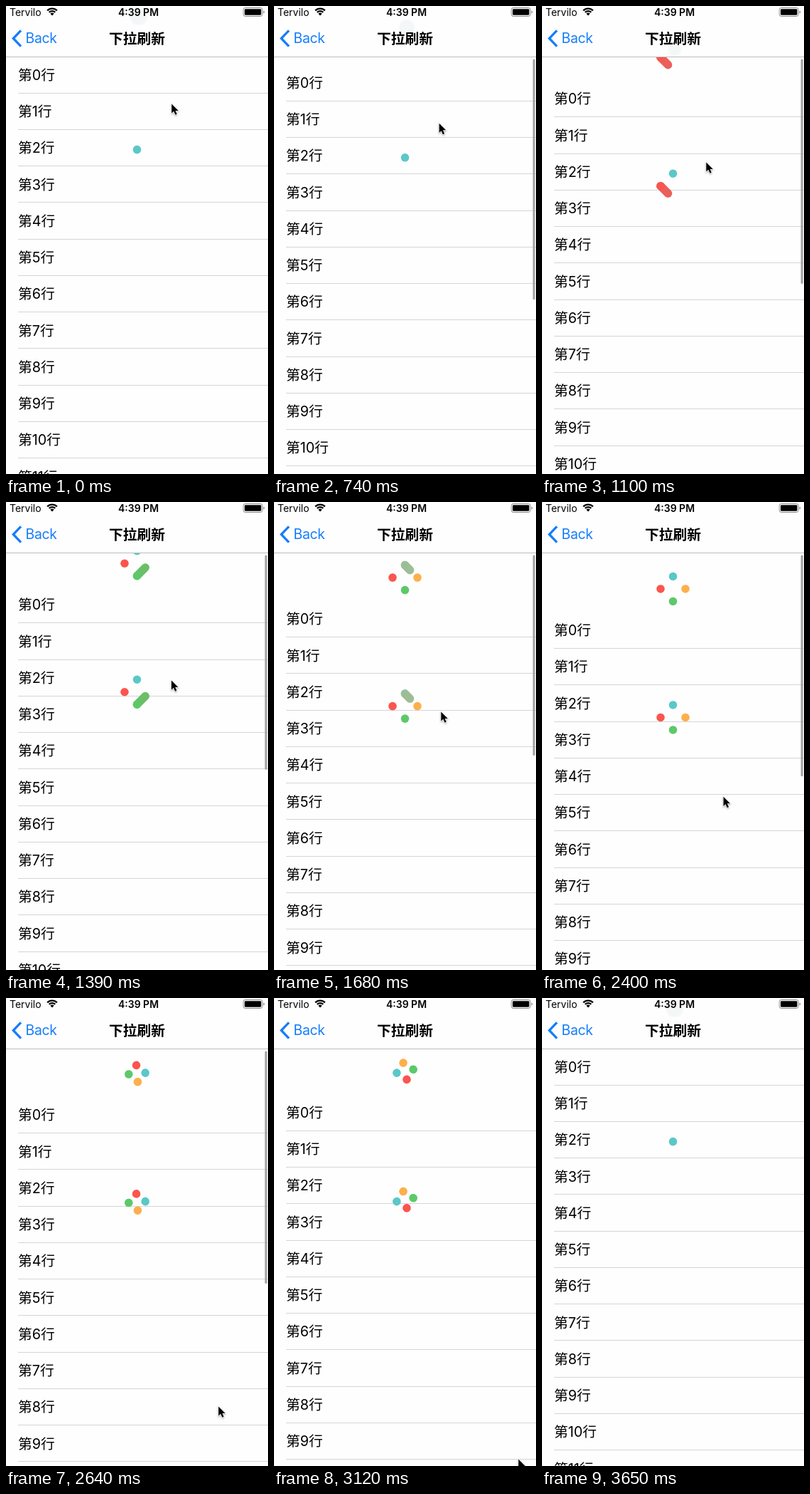
Animation of 369 by 657 pixels, one loop 3.91 s. Source, as an HTML page:

```html
<!DOCTYPE html>
<html lang="zh">
<head>
<meta charset="utf-8">
<title>下拉刷新</title>
<style>
  html, body { margin: 0; width: 100%; height: 100%; overflow: hidden; background: #fefefe; }
  svg { display: block; width: 369px; height: 657px; }
  text { font: 19.8px Inter, "Noto Sans CJK SC", "Noto Sans CJK", sans-serif; }
  .status { font-size: 14px; }
  .back { font-size: 19.4px; letter-spacing: -.3px; }
  .bold { font-weight: 600; }
  .mid { text-anchor: middle; }
  #rows path { stroke: #d5d5d7; shape-rendering: crispEdges; }
</style>
</head>
<body>
<svg viewBox="0 0 369 657">
  <defs>
    <filter id="soft" x="-50%" y="-50%" width="200%" height="200%"><feGaussianBlur stdDeviation="1"/></filter>
    <clipPath id="barClip"><path d="M0 0h369v71H0z"/></clipPath>
  </defs>

  <g id="table">
    <g id="rows"></g>
    <g id="loader" transform="translate(184.5 38.6)">
      <g id="spin">
        <circle class="dot" r="5.8"/>
        <line id="link" stroke-width="11.6" stroke-linecap="round"/>
        <circle class="dot" r="5.8"/>
        <circle class="dot" r="5.8"/>
        <circle class="dot" r="5.8"/>
      </g>
    </g>
    <use href="#loader" y="180.5"/>
  </g>

  <g id="bar" clip-path="url(#barClip)">
    <path d="M0 0h369v71H0z" fill="#fefefe"/>
    <circle id="smudge" cx="187" fill="#f4f7f7" filter="url(#soft)"/>
  </g>
  <path d="M0 71.5h369" stroke="#bcbcbe"/>
  <text class="status" x="5" y="13.5">Tervilo</text>
  <path d="M58.2 6.4a9.6 9.6 0 0 1 13.6 0M60.8 8.9a6 6 0 0 1 8.4 0" fill="none" stroke="#000" stroke-width="2.3"/>
  <path d="M65 13.4l-2.6-2.6a3.7 3.7 0 0 1 5.2 0z"/>
  <text class="status bold mid" x="186.5" y="13.5">4:39 PM</text>
  <rect x="334.3" y="2.5" width="26.8" height="12" rx="2.8" fill="none" stroke="#8a8a8a"/>
  <rect x="336" y="4.2" width="23.4" height="8.6" rx="1.4"/>
  <path d="M362.6 6.5a2.2 2.2 0 0 1 0 4.2z" fill="#8a8a8a"/>
  <path d="M21 34.3L10.3 45.5 21 56.7" fill="none" stroke="#157efb" stroke-width="3.3"/>
  <text class="back" x="27.6" y="52.4" fill="#157efb">Back</text>
  <text class="bold mid" x="184.5" y="53.2">下拉刷新</text>

  <rect id="thumb" x="364.6" y="74.5" width="3" rx="1.5" fill="#a0a0a0"/>
  <path id="cursor" d="M.3-.6V12.6L3.3 9.8 5.5 14.8 7.8 13.8 5.6 8.9H9.8Z" stroke="#fff" stroke-width="1.4" paint-order="stroke"
    style="filter:drop-shadow(0 1px 1px rgba(0,0,0,.35))"/>
</svg>
<script>
  const LOOP = 3910, UNIT = 1.165, REACH = 17.5, ROW = 51.25;
  const RELEASE = 2370, SPIN = 2403, RETURN = 3370, REST = 3650;
  const $ = id => document.getElementById(id);
  const dots = [...document.querySelectorAll('.dot')];
  const colors = [[90, 200, 200], [250, 85, 78], [92, 201, 105], [253, 175, 75]];
  const homes = [[0, -1], [-1, 0], [0, 1], [1, 0]];  // top, left, bottom, right

  // Each key: time, value(s)
  const pullKeys = [[560, 0], [1100, 33.6], [1680, 67.5], [2040, 85], [2160, 88]];
  const linkKeys = [[560, 0], [1100, 28], [1680, 53], [1800, 55]];
  const cursorKeys = [[560, 233, 138], [1100, 231, 220], [1680, 235, 295], [2040, 236, 341],
    [2160, 237, 348], [2300, 237, 348], [2640, 299, 574], [3120, 344, 648], [3360, 352, 664]];

  const clamp = x => Math.max(0, Math.min(1, x));
  const mix = (a, b, k) => a + (b - a) * k;
  const mixAll = (a, b, k) => a.map((v, i) => mix(v, b[i], k));
  const ease = k => (1 - Math.cos(Math.PI * clamp(k))) / 2;
  const rgb = c => `rgb(${c.map(Math.round)})`;
  const set = (el, attrs) => { for (const k in attrs) el.setAttribute(k, attrs[k]); };

  function track(keys, t) {
    let i = 1;
    while (i < keys.length - 1 && t > keys[i][0]) i++;
    const [a, b] = [keys[i - 1], keys[i]];
    return mixAll(a, b, clamp((t - a[0]) / (b[0] - a[0]))).slice(1);
  }

  // The picture advances in 60 ms steps
  function snap(t) {
    if (t < 620) return 0;
    const base = t >= 3410 ? 3410 : t >= 1680 ? 1680 : 620;
    return base + Math.floor((t - base) / 60) * 60;
  }

  function offset(t) {
    if (t < RELEASE) return track(pullKeys, t)[0];
    if (t < RETURN) return 64 + 24 * Math.exp((RELEASE - t) / 140);
    return 64 * (1 - ease((t - RETURN) / (REST - 10 - RETURN)));
  }

  // The link fades from each dot's colour to the next, half a stage early
  function linkColor(p) {
    const n = Math.floor((p + 5) / 10);
    return mixAll(colors[Math.max(0, n - 1)], colors[n % 4], 1 - Math.exp(-((p + 5) % 10) / 3.4));
  }

  function drawLoader(t) {
    const active = t < REST;
    const p = active ? track(linkKeys, t)[0] - 15 : -1;
    const stage = Math.floor(p / 10), sub = p - stage * 10;
    const linked = p >= 0 && p < 40;

    const spinning = t >= SPIN && active;
    const phase = spinning ? (t - SPIN) / 1000 : 0;
    const reach = REACH - 5 * UNIT * ease(1 - Math.abs(1 - (phase * 4) % 2));
    set($('spin'), { transform: `rotate(${phase * 360})` });
    dots.forEach((dot, i) => set(dot, {
      cx: homes[i][0] * reach, cy: homes[i][1] * reach,
      visibility: !i || i <= stage ? 'visible' : 'hidden'
    }));

    set($('link'), { visibility: linked ? 'visible' : 'hidden' });
    if (!linked) return;
    const at = k => mixAll(homes[stage], homes[(stage + 1) % 4], clamp(k)).map(v => v * REACH);
    const [x1, y1] = at(sub / 5 - 1), [x2, y2] = at(sub / 5);
    set($('link'), { x1, y1, x2, y2, stroke: rgb(linkColor(p)) });
  }

  function draw(t) {
    const off = offset(t);
    set($('table'), { transform: `translate(0 ${off})` });
    drawLoader(t);
    set($('smudge'), { cy: 15 + 1.38 * off, r: Math.max(0, 12 - off * 0.09) });
    set($('thumb'), {
      height: (t < RELEASE ? 349 : 394) - off,
      opacity: t < 620 ? 0 : 1 - clamp((t - 2840) / 260)
    });
    set($('cursor'), { transform: `translate(${track(cursorKeys, t)})` });
  }

  $('rows').innerHTML = Array.from({ length: 12 }, (_, i) =>
    `<text x="17" y="${103.8 + i * ROW}">第${i}行</text>` +
    `<path d="M17 ${122.2 + i * ROW}H369"/>`).join('');
  dots.forEach((dot, i) => set(dot, { fill: rgb(colors[i]) }));

  const start = performance.now();
  function tick() {
    draw(snap((performance.now() - start) % LOOP));
    requestAnimationFrame(tick);
  }
  tick();
</script>
</body>
</html>
```
